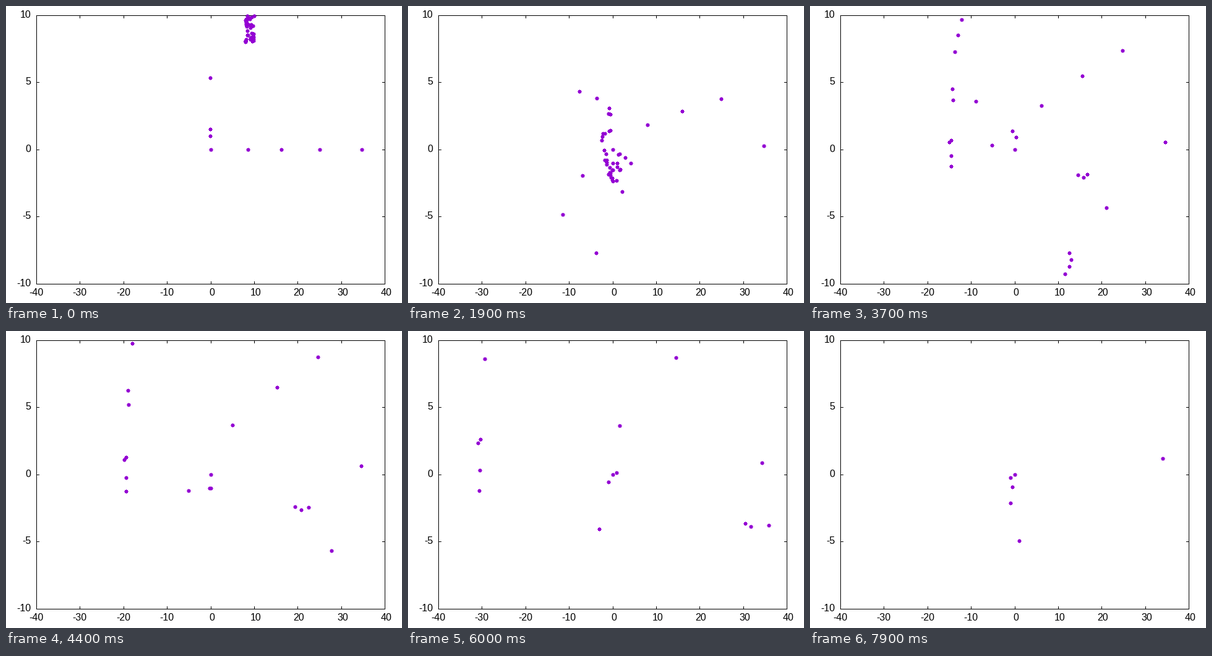
A matplotlib script for the animation above (8 s loop, 640 px wide and 480 px high).

```python
import numpy as np
import matplotlib.pyplot as plt
from matplotlib.animation import FuncAnimation
from matplotlib.collections import PolyCollection

W, H, DPI = 640, 480, 100
LEFT, RIGHT, TOP, BOTTOM = 49, 612, 15, 449
X_MAX, Y_MAX, TICK = 40, 10, 5
FRAMES, STEP, SUBSTEPS = 80, 0.5, 250
SPLIT = 29                        # step at which the asteroids are pinned
TIMES = STEP * np.arange(FRAMES)

# Positions and velocities are complex numbers; the sun has GM = 1.
PLANETS = np.array([1j, 1.5j, 5.34j, 8.6, 16.22, 25.08, 34.75]) - 1e-3
PLANET_SPEEDS = np.array([-1, -0.734, -0.4265, 0.198j, 0.301j, 0.4j, 0.03j])

# Asteroids on their way out, at step SPLIT
ASTEROIDS = np.array([
    -3.48 + 8.48j, -7.03 + 6.54j, -7.89 + 5.99j, -8.45 + 5.25j,
    -8.88 + 4.42j, -9.02 + 2.53j, -8.74 + 1.94j, -9.31 - 0.05j,
    -8.88 + 0j, -8.88 - 0.74j, -8.88 - 1.24j, 8.88 - 1.24j,
    10.3 - 1.43j, 7.6 - 4.84j, 8.17 - 5.3j, 7.89 - 5.62j,
    7.03 - 5.85j, 3.48 - 8.29j, 3.2 - 8.39j, 5.33 - 8.34j,
    0.36 - 8.85j, -0.36 - 9.31j, 0.36 - 9.17j, 0.64 - 9.31j,
    1.21 - 9.12j, 1.35 - 9.35j, 1.07 - 9.26j, 2.06 - 9.4j,
    2.49 - 9.17j, 2.63 - 9.35j])
V_INF = np.sqrt(2 - 2 / 12.7)     # speed far from the sun

# Near misses flung out by the sun: time, exit point, exit velocity
FLUNG = [(9.15, 0, -19.66 - 5.55j), (7.72, 0, -6.4 - 2.72j),
         (7.2, 0, -1.61 - 3.35j), (7.74, 0, -4.32 + 2.47j),
         (7.3, -0.18j, 1.885 - 0.372j), (8.51, -0.14j, 1.67 - 0.169j),
         (7.4, 0, 1.05 - 1.495j), (7.25, -0.14, -0.284 + 1.372j),
         (7.3, -0.33, -0.24 + 1.22j), (7.3, 0.12, -0.284 + 1.2j)]

# One asteroid lingers near the sun before it escapes
STRAY_T = [0, 8.3, 9.5, 14.5, 17, 18.5, 22]
STRAY_Z = [9.1 + 9.1j, 0.1 + 0.1j, -1.35 - 0.95j, -0.92 - 1.34j, 0,
           -8.88 + 3.6j, -28.93 + 11.72j]


def orbit(z, v, step, count):
    """Leapfrog around the sun; positions after 0..count steps."""
    h = step / SUBSTEPS
    path = [z]
    for _ in range(count):
        for _ in range(SUBSTEPS):
            z = z + v * h / 2
            v = v - h * z / abs(z) ** 3
            z = z + v * h / 2
        path.append(z)
    return path


def outbound_velocity(z):
    """Velocity at z on the hyperbola that came in along the diagonal."""
    r = abs(z)
    turn = np.where(z.imag > z.real, -1, 1)
    theta = turn * (np.angle(z) - np.pi / 4)
    a, b = 1 - np.cos(theta), V_INF * np.sin(theta)
    momentum = 2 * a / (-b + np.sqrt(b * b + 4 * a / r))
    across = momentum / r
    along = np.sqrt(V_INF ** 2 + 2 / r - across ** 2)
    return (along + 1j * turn * across) * z / r


def flung_path(t0, exit_point, v):
    left = np.maximum(t0 - TIMES, 0)
    inbound = (1 + 1j) * (left + 0.8 * (1 - np.exp(-left)))
    return np.where(TIMES < t0, inbound, exit_point + v * (TIMES - t0))


def all_paths():
    planets = orbit(PLANETS, PLANET_SPEEDS, STEP, FRAMES - 1)
    v = outbound_velocity(ASTEROIDS)
    before = orbit(ASTEROIDS, v, -STEP, SPLIT)
    after = orbit(ASTEROIDS, v, STEP, FRAMES - 1 - SPLIT)
    flung = [flung_path(*f) for f in FLUNG]
    stray = np.interp(TIMES, STRAY_T, np.array(STRAY_Z))
    stray[TIMES > STRAY_T[-1]] = 2 * X_MAX
    sun = np.zeros(FRAMES)
    return np.column_stack([planets, before[::-1] + after[1:],
                            np.transpose(flung), stray, sun])


def to_pixels(x, y):
    """Column and row of the pixel that holds a data point."""
    px = (LEFT + RIGHT) / 2 + x * (RIGHT - LEFT) / (2 * X_MAX)
    py = (BOTTOM - TOP) / 2 + y * (BOTTOM - TOP) / (2 * Y_MAX)
    return np.floor(px + 0.5), BOTTOM - np.floor(py + 0.5)


def bar(x, y, w=1, h=1):
    return [(x, y), (x + w, y), (x + w, y + h), (x, y + h)]


def draw_axes(ax):
    w, h = RIGHT - LEFT + 1, BOTTOM - TOP + 1
    bars = [bar(LEFT, TOP, w=w), bar(LEFT, BOTTOM, w=w),
            bar(LEFT, TOP, h=h), bar(RIGHT, TOP, h=h)]
    font = dict(family="Liberation Sans", size=16 * 72 / DPI, va="baseline")
    for v in range(-X_MAX, X_MAX + 1, 10):
        x, _ = to_pixels(v, 0)
        bars += [bar(x, TOP, h=TICK), bar(x, BOTTOM + 1 - TICK, h=TICK)]
        ax.text(x + (2.2 if v >= 0 else 0), 468, str(v), ha="center", **font)
    for v in range(-Y_MAX, Y_MAX + 1, 5):
        _, y = to_pixels(0, v)
        bars += [bar(LEFT, y, w=TICK), bar(RIGHT + 1 - TICK, y, w=TICK)]
        ax.text(40.5, y + 4, str(v), ha="right", **font)
    ax.add_collection(PolyCollection(bars, facecolors="black", linewidths=0,
                                     antialiaseds=False))


fig = plt.figure(figsize=(W / DPI, H / DPI), dpi=DPI, facecolor="white")
ax = fig.add_axes([0, 0, 1, 1])
ax.set_xlim(0, W)
ax.set_ylim(H, 0)
ax.axis("off")
draw_axes(ax)

# Seven-pixel disc: one quarter of the outline, turned four times
quarter = np.array([0.5 + 3.5j, 0.5 + 2.5j, 2.5 + 2.5j, 2.5 + 0.5j, 3.5 + 0.5j])
disc = np.concatenate([quarter * (-1j) ** k for k in range(4)])
DISC = np.column_stack([disc.real, disc.imag]) + 0.5

dots = PolyCollection([], facecolors="#9400D3", linewidths=0,
                      antialiaseds=False, zorder=3)
ax.add_collection(dots)
paths = all_paths()


def update(n):
    z = paths[n]
    z = z[(abs(z.real) <= X_MAX) & (abs(z.imag) <= Y_MAX)]
    pixels = np.column_stack(to_pixels(z.real, z.imag))
    dots.set_verts([DISC + p for p in pixels])
    return dots,


anim = FuncAnimation(fig, update, frames=FRAMES, interval=100,
                     repeat=True, repeat_delay=0)
plt.show()
```
